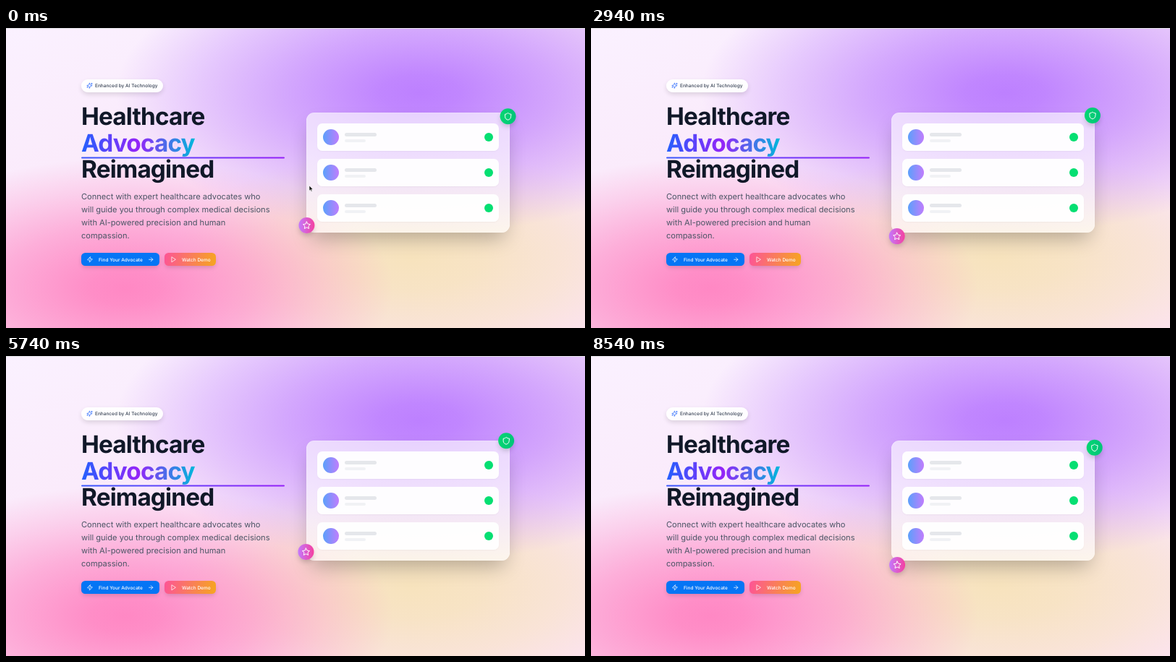
An HTML page for the animation above (8.61 s loop, 800 px wide and 415 px high).

```html
<!DOCTYPE html>
<html lang="en">
<head>
<meta charset="utf-8">
<title>Healthcare Advocacy</title>
<style>
html, body { margin: 0; width: 100%; height: 100%; overflow: hidden; }
#stage {
  position: relative; width: 800px; height: 415px; overflow: hidden;
  background:
    linear-gradient(#dcdce0, #dcdce0) 0 0 / 100% 1px no-repeat,
    radial-gradient(420px 195px at 572px 90px, #bd80ff, #bd80fff0 13%, #bd80ffa0 45%, #bd80ff55 72%, #bd80ff00),
    radial-gradient(370px 180px at 165px 360px, #ff88c4, #ff88c4f0 13%, #ff88c498 48%, #ff88c444 75%, #ff88c400),
    radial-gradient(330px 150px at 560px 318px, #f7e3bd, #f7e3bdd8 30%, #f7e3bd80 65%, #f7e3bd00),
    linear-gradient(160deg, #faf1ff, #fae6f8 55%, #fce3ef);
}
#stage div, svg { position: absolute; }
.pill { left: 104px; top: 71px; width: 113px; height: 18px; border-radius: 9px;
  background: #fffffff2; box-shadow: 0 3px 6px #0000001f; }
.card { left: 415px; top: 117px; width: 281px; height: 166px; border-radius: 11px;
  background: #ffffffa0; box-shadow: 0 14px 28px -7px #00000048, inset 0 0 0 .6px #ffffff50; }
.row { left: 15px; width: 251px; height: 38px; border-radius: 7px; background: #fffffff0;
  box-shadow: 0 1px 2px #0000000a; }
.row div { border-radius: 11px; }
.face { left: 8px; top: 8px; width: 22px; height: 22px; background: linear-gradient(90deg, #5ba0fb, #c07dfd); }
.long { left: 38px; top: 13px; width: 44px; height: 5px; background: #e5e7eb; }
.short { left: 38px; top: 22px; width: 29px; height: 4px; background: #f1f2f5; }
.dot { left: 231px; top: 13px; width: 12px; height: 12px; background: #05df72; }
.btn { top: 311px; height: 18px; border-radius: 5.5px; box-shadow: 0 3px 6px -1px #00000028; }
.find { left: 104px; width: 108px; background: #0575f5; }
.demo { left: 219px; width: 71px; background: linear-gradient(100deg, #fd5496, #f6a61f); }
.badge { left: -11px; top: -11px; width: 22px; height: 22px; border-radius: 50%;
  box-shadow: 0 4px 7px -1px #00000030; }
.shield { background: linear-gradient(90deg, #05d772, #00c37a); }
.star { background: linear-gradient(90deg, #c478fd, #f5409f); }
.badge svg { left: 5px; top: 5px; width: 12px; height: 12px; }
svg { left: 0; top: 0; overflow: visible; }
text { font-family: Inter, sans-serif; text-rendering: geometricPrecision; white-space: pre; }
.title { font-size: 33.3px; font-weight: 700; letter-spacing: -.025em; fill: #101828; }
.lead { font-size: 11.1px; fill: #4a5565; }
.label { font-size: 6.5px; font-weight: 500; fill: #fff; }
.icon { fill: none; stroke: #fff; stroke-width: 2; stroke-linecap: round; stroke-linejoin: round; }
</style>
</head>
<body>
<div id="stage">
  <div class="pill"></div>
  <div class="card" id="card"></div>
  <div class="btn find"></div>
  <div class="btn demo"></div>

  <svg width="800" height="415">
    <defs>
      <linearGradient id="word" gradientUnits="userSpaceOnUse" x1="104" x2="261">
        <stop stop-color="#2460fd"/><stop offset=".5" stop-color="#9424f8"/><stop offset="1" stop-color="#00b8db"/>
      </linearGradient>
      <linearGradient id="rule">
        <stop stop-color="#3a58fc"/><stop offset="1" stop-color="#9420f8"/>
      </linearGradient>
    </defs>
    <text class="label" x="123" y="82" style="fill:#364153">Enhanced by AI Technology</text>
    <g class="title">
      <text x="104" y="134">Healthcare</text>
      <rect x="104" y="178.4" width="281" height="2.2" rx="1.1" fill="url(#rule)"/>
      <text x="104" y="170.6" fill="url(#word)" style="fill:url(#word)">Advocacy</text>
      <text x="104" y="207.2">Reimagined</text>
    </g>
    <g class="lead">
      <text x="104" y="237.4">Connect with expert healthcare advocates who</text>
      <text x="104" y="255.4">will guide you through complex medical decisions</text>
      <text x="104" y="273.4">with AI-powered precision and human</text>
      <text x="104" y="291.4">compassion.</text>
    </g>
    <text class="label" x="128" y="322.6">Find Your Advocate</text>
    <text class="label" x="243" y="322.6">Watch Demo</text>
    <g class="icon">
      <path transform="translate(111 75.2) scale(.37)" stroke="#2b6bfd"
        d="M10 15.5 8.5 14 2.4 12.5 2.4 11.5 8.5 10 10 8.5 11.5 2.4 12.5 2.4 14 8.5 15.5 10 21.6 11.5 21.6 12.5 15.5 14 14 15.5 12.5 21.6 11.5 21.6ZM20 3V7M22 5H18M4 17V19M5 18H3"/>
      <path transform="translate(111.5 315.8) scale(.37)"
        d="M4 14a1 1 0 0 1-.8-1.6l9.9-10.2a.5.5 0 0 1 .9.5L12 8.700a1 1 0 0 0 1 1.300h7a1 1 0 0 1 .8 1.600l-9.900 10.200a.5.5 0 0 1-.9-.5l2-6a1 1 0 0 0-1-1.300z"/>
      <path transform="translate(195.8 315.8) scale(.37)" d="M5 12H19M12 5l7 7-7 7"/>
      <path transform="translate(227 315.8) scale(.37)" d="M6 3 20 12 6 21Z"/>
    </g>
  </svg>

  <div id="shield"><div class="badge shield"><svg class="icon" viewBox="0 0 24 24">
    <path d="M20 13c0 5-3.500 7.500-8 9-4.500-1.500-8-4-8-9V6c3 0 6-1.500 8-3.500 2 2 5 3.500 8 3.500z"/></svg></div></div>
  <div id="star"><div class="badge star"><svg class="icon" viewBox="0 0 24 24">
    <path d="M12 2l3.100 6.300 6.900 1-5 4.900 1.200 6.800-6.200-3.200L5.800 21 7 14.200 2 9.300l6.900-1z"/></svg></div></div>

  <svg id="cursor" width="8" height="10">
    <path d="M0 0V7.200L1.700 5.700 2.800 8.300 4 7.800 2.900 5.300H5.100Z" fill="#111" stroke="#fff" stroke-width=".6"/>
  </svg>
</div>
<script>
const LOOP = 8610, FLOAT = 6300;
const el = id => document.getElementById(id);
const place = (id, x, y) => el(id).style.transform = `translate(${x}px, ${y}px)`;

el('card').innerHTML = [15, 64, 113].map(y =>
  `<div class="row" style="top:${y}px"><div class="face"></div><div class="long"></div>
   <div class="short"></div><div class="dot"></div></div>`).join('');

// Drifts along a short diagonal; lowest at time `low`.
function drift(id, x, y, low, t) {
  const k = Math.cos((t - low) / FLOAT * 2 * Math.PI);
  place(id, x + 4.4 * k, y + 9.2 * k);
}

function draw(now) {
  const t = now % LOOP;
  drift('shield', 692.8, 120.6, 1400, t);
  drift('star', 418.8, 280, 2450, t);
  const p = (t / 840) ** 1.4;
  place('cursor', 419 - 20 * p, 218 - 139 * p);
  el('cursor').style.visibility = t < 1300 ? 'visible' : 'hidden';
  requestAnimationFrame(draw);
}
draw(performance.now());
</script>
</body>
</html>
```
